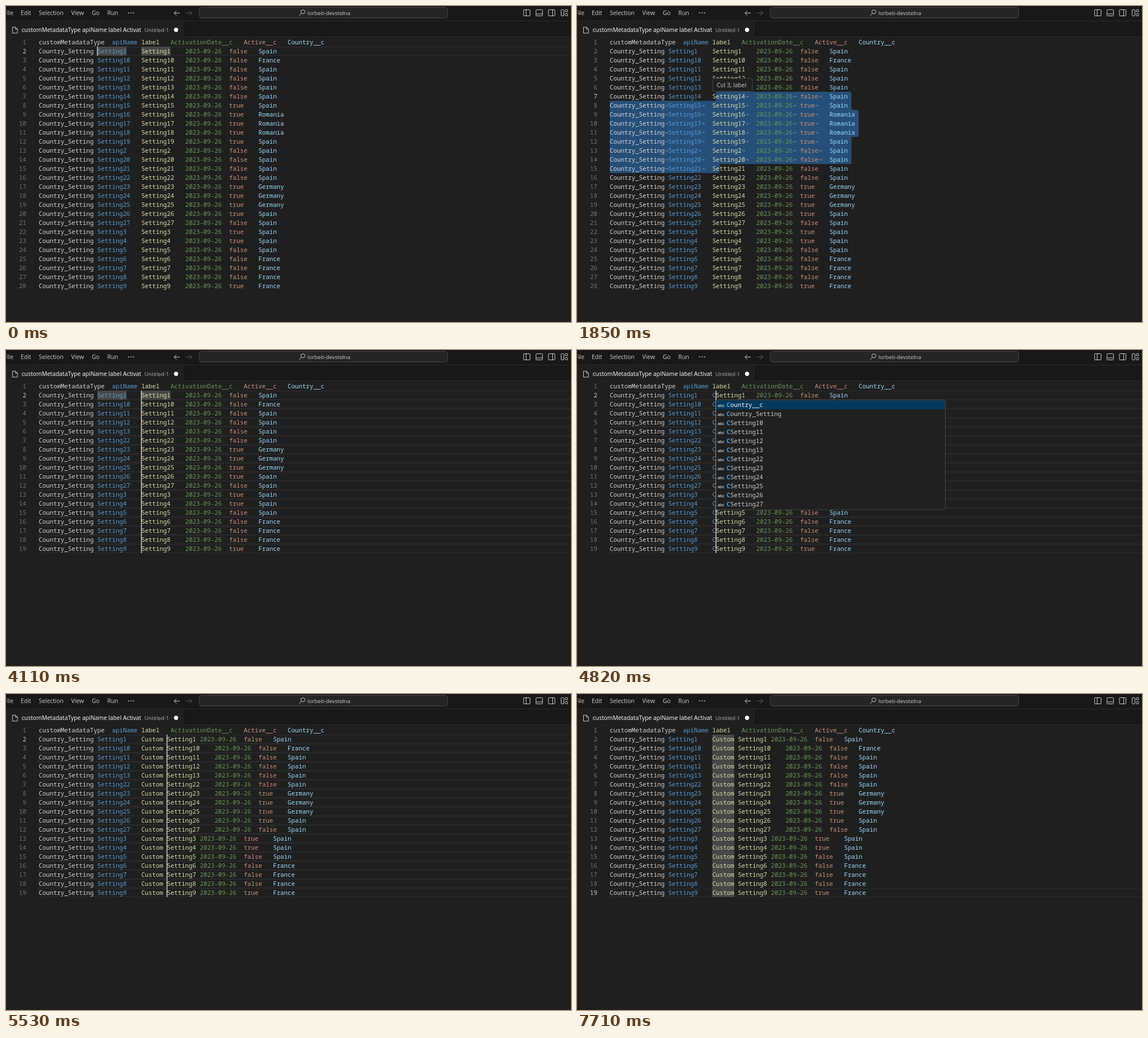
Animation of 1001x560 px, one loop 8000 ms. Source, as an HTML page:

```html
<!DOCTYPE html>
<html lang="en">
<head>
<meta charset="utf-8">
<title>Multi-cursor editing</title>
<style>
  html, body { margin: 0; width: 100%; height: 100%; overflow: hidden; background: #1f1f1f; }
  svg { display: block; width: 100%; height: 100%; }
  .code { font: 10.81px "Noto Sans Mono", "DejaVu Sans Mono", monospace; }
  .ui { font: 10.4px "Open Sans", "Noto Sans", sans-serif; fill: #ccc; }
  .icon { fill: none; stroke: #ccc; stroke-width: 1; }
</style>
</head>
<body>
<svg viewBox="0 0 1001 560" xmlns="http://www.w3.org/2000/svg">
  <rect width="1001" height="560" fill="#1f1f1f"/>
  <rect width="1001" height="55" fill="#181818"/>
  <rect y="26" width="1001" height="1" fill="#2b2b2b"/>
  <rect x="314" y="54" width="687" height="1" fill="#2b2b2b"/>
  <rect y="27" width="313" height="28" fill="#1f1f1f"/>
  <rect x="313" y="27" width="1" height="28" fill="#2b2b2b"/>
  <rect y="26" width="1" height="534" fill="#2b2b2b"/>

  <g class="ui">
    <text x="13" y="16" text-anchor="end">File</text>
    <text x="26" y="16">Edit</text>
    <text x="58" y="16">Selection</text>
    <text x="115.5" y="16">View</text>
    <text x="152" y="16">Go</text>
    <text x="179.5" y="16">Run</text>
    <circle cx="217.3" cy="12.3" r="1"/><circle cx="221.6" cy="12.3" r="1"/><circle cx="225.9" cy="12.3" r="1"/>
  </g>
  <path class="icon" d="M308 12.5H298M302 8.2L297.7 12.5L302 16.8"/>
  <path class="icon" style="stroke:#606060" d="M319 12.5H329M325 8.2L329.3 12.5L325 16.8"/>

  <rect x="342.5" y="2.5" width="440" height="19" rx="4.5" fill="#252525" stroke="#454545"/>
  <g class="icon"><circle cx="526" cy="10.3" r="3.6"/><path d="M523.4 13L519.3 17.3"/></g>
  <text class="ui" x="534" y="16" style="font-size:9.7px">lorbeti-devstelna</text>

  <g class="icon">
    <rect x="917" y="6.5" width="11.5" height="11" rx="1"/><path d="M921.5 6.5V17.5"/>
    <rect x="939" y="6.5" width="11.5" height="11" rx="1"/><path d="M939 14H950.5"/>
    <rect x="961" y="6.5" width="11.5" height="11" rx="1"/><path d="M968.5 6.5V17.5"/>
    <rect x="983.5" y="6.5" width="5" height="11" rx="1"/>
    <rect x="991" y="6.5" width="4" height="4" rx="1"/><rect x="991" y="13.5" width="4" height="4" rx="1"/>
  </g>

  <path class="icon" d="M11.5 37.5H17L20.3 40.8V48H11.5ZM16.8 37.5V41H20.3"/>
  <text class="ui" x="27.7" y="46" style="font-size:10.35px;fill:#fff">customMetadataType apiName label Activat</text>
  <text class="ui" x="245.5" y="46" style="font-size:9.3px;fill:#b4b4b4">Untitled-1</text>
  <circle cx="301.3" cy="42.3" r="3.7" fill="#fff"/>

  <g id="editor"></g>
</svg>
<script>
const LOOP = 8000, LEFT = 58, CHAR = 6.487, ROW = 16, TAB = 4;
const COLORS = ['#d4d4d4', '#569cd6', '#dcdcaa', '#6a9955', '#ce9178', '#9cdcfe'];
const HEADER = ['customMetadataType', 'apiName', 'label', 'ActivationDate__c', 'Active__c', 'Country__c'];
const ANCHOR = { line: 15, col: 30 };

const colX = col => LEFT + col * CHAR;
const lineY = line => 40 + line * ROW;
const between = (n, a, b) => n >= a && n <= b;

// Settings sorted by name, so 10 comes before 2
const ids = Array.from({ length: 27 }, (_, i) => String(i + 1)).sort();
const kept = ids.filter(id => !(between(+id, 14, 21) || id === '2'));

const isActive = n => between(n, 15, 19) || between(n, 23, 26) || [3, 4, 9].includes(n);
function country(n) {
  if (n === 10 || between(n, 6, 9)) return 'France';
  if (between(n, 16, 18)) return 'Romania';
  return between(n, 23, 25) ? 'Germany' : 'Spain';
}

const wide = ['Country__c', 'Country_Setting',
  ...kept.filter(id => id.length > 1).map(id => 'CSetting' + id)];
const narrow = ['customMetadataType', 'Country__c', 'Country_Setting'];
const single = ['customMetadataType'];

const START = { line: 2, col: 16, on: 1, mark: 'Setting1', ids, typed: '', settled: 0,
  sel: 0, multi: 0, tip: 0, tipLine: 7, list: null, listCol: 0, query: '' };
const STEPS = [
  [450, { on: 0 }],
  [920, { on: 1 }],
  [1230, { line: 12, col: 29, mark: '', sel: 1 }],
  [1300, { line: 8 }],
  [1380, { line: 7 }],
  [1770, { tip: 0.5 }],
  [1850, { tip: 1, on: 0 }],
  [2010, { ids: kept, sel: 0, tip: 0, on: 1 }],
  [2550, { on: 0 }],
  [3020, { on: 1 }],
  [3260, { line: 2, col: 28 }],
  [3480, { mark: 'Setting1' }],
  [3720, { on: 0 }],
  [4110, { multi: 1, on: 1 }],
  [4190, { tip: 0.5, tipLine: 19 }],
  [4270, { tip: 1 }],
  [4820, { typed: 'C', col: 29, mark: '', tip: 0, list: wide, listCol: 29, query: 'C' }],
  [4900, { typed: 'Cu', col: 30 }],
  [4980, { list: narrow, listCol: 30, query: 'Cu' }],
  [5140, { typed: 'Cust', col: 32, list: single, listCol: 32, query: 'Cust' }],
  [5220, { typed: 'Custo', col: 33, listCol: 33, query: 'Custo' }],
  [5370, { typed: 'Custom', col: 34, listCol: 34, query: 'Custom' }],
  [5450, { typed: 'Custom ', col: 35, list: null }],
  [5530, { settled: 1 }],
  [6000, { on: 0 }],
  [6540, { on: 1 }],
  [7010, { on: 0 }],
  [7250, { multi: 0, line: 19, col: 31, on: 1 }],
  [7480, { mark: 'Custom' }],
  [7710, { on: 0 }]
];

const rect = (x, y, w, h, fill, more = '') =>
  `<rect x="${x}" y="${y}" width="${w}" height="${h}" fill="${fill}" ${more}/>`;
const text = (x, y, str, fill, more = '') =>
  `<text x="${x}" y="${y}" fill="${fill}" ${more}>${str}</text>`;

// Places fields at tab stops
function layout(fields) {
  let col = 0;
  const cells = fields.map((str, i) => {
    const cell = { col, end: col + str.length, str, color: COLORS[i] };
    col = (Math.floor(cell.end / TAB) + 1) * TAB;
    return cell;
  });
  return { cells, end: cells[cells.length - 1].end };
}

function buildLines(s) {
  const rows = s.ids.map(id => ['Country_Setting', 'Setting' + id, s.typed + 'Setting' + id,
    '2023-09-26', String(isActive(+id)), country(+id)]);
  return [HEADER, ...rows].map(layout);
}

function drawCells(cells, y, s, line) {
  return cells.map((cell, i) => {
    const n = line > 1 && i === 2 && !s.settled ? s.typed.length : 0;
    const head = n ? text(colX(cell.col), y, cell.str.slice(0, n), COLORS[1]) : '';
    return head + text(colX(cell.col + n), y, cell.str.slice(n), cell.color);
  }).join('');
}

function drawMarks(cells, y, mark) {
  return cells.filter(c => mark && c.str.split(' ')[0] === mark)
    .map(c => rect(colX(c.col), y, mark.length * CHAR, ROW, '#474747')).join('');
}

// Rectangle with its own radius at each corner: tl, tr, br, bl
function roundBox(x1, x2, y, [a, b, c, d]) {
  const y2 = y + ROW;
  return `<path fill="#264f78" d="M${x1 + a} ${y}H${x2 - b}Q${x2} ${y} ${x2} ${y + b}V${y2 - c}` +
    `Q${x2} ${y2} ${x2 - c} ${y2}H${x1 + d}Q${x1} ${y2} ${x1} ${y2 - d}V${y + a}Q${x1} ${y} ${x1 + a} ${y}Z"/>`;
}

function tabArrow(col, y) {
  const x = colX(col) + 1, m = y + 8.5;
  return `<path d="M${x} ${m}h4.6m-1.8 -1.8l1.8 1.8l-1.8 1.8" fill="none" stroke="#fff" stroke-opacity=".3" stroke-width=".9"/>`;
}

function drawSelection(lines, s) {
  const spans = [];
  for (let n = s.line; n <= ANCHOR.line; n++) {
    spans.push({ n, from: n === s.line ? s.col : 0, to: n === ANCHOR.line ? ANCHOR.col : lines[n - 1].end + 1 });
  }
  return spans.map((p, i) => {
    const up = spans[i - 1], down = spans[i + 1];
    const r = bare => bare ? 2.5 : 0;
    const corners = [r(!up || up.from > p.from), r(!up || up.to < p.to),
      r(!down || down.to < p.to), r(!down || down.from > p.from)];
    const y = lineY(p.n);
    const arrows = lines[p.n - 1].cells.slice(0, -1)
      .filter(c => c.end >= p.from && c.end < p.to).map(c => tabArrow(c.end, y));
    return roundBox(colX(p.from), colX(p.to), y, corners) + arrows.join('');
  }).join('');
}

function drawTip(s) {
  const y = lineY(s.tipLine) - 24;
  return `<g opacity="${s.tip}">` + rect(240.5, y + 0.5, 70, 23, '#202020', 'stroke="#454545" rx="2"') +
    text(247.5, y + 16, 'Col 3, label', '#ccc', 'class="ui"') + '</g>';
}

// Colours the letters that match the query in order
function matchSpans(str, query) {
  let k = 0;
  return [...str].map(ch => {
    const hit = k < query.length && ch.toLowerCase() === query[k].toLowerCase();
    if (hit) k++;
    return hit ? `<tspan fill="#2aaaff" font-weight="600">${ch}</tspan>` : ch;
  }).join('');
}

function drawList(s) {
  const x = Math.round(colX(s.listCol)), top = 88;
  const frame = rect(x + 0.5, top + 0.5, 406, s.list.length * ROW + 2.5, '#202020', 'stroke="#454545" rx="1.5"');
  const items = s.list.map((str, i) => {
    const y = top + 13 + i * ROW;
    return text(x + 3, y - 0.5, 'abc', '#ccc', 'style="font:600 7.6px Open Sans,sans-serif;letter-spacing:-.3px"') +
      text(x + 19, y, matchSpans(str, s.query), i ? '#ccc' : '#fff');
  });
  return frame + rect(x + 1, top + 1.3, 405, ROW, '#04395e') + items.join('');
}

function draw(s) {
  const lines = buildLines(s);
  const isCursorLine = n => s.multi ? n > 1 : n === s.line;
  let back = '', front = '', cursors = '';
  lines.forEach(({ cells }, i) => {
    const n = i + 1, y = lineY(n);
    if (isCursorLine(n)) {
      if (!s.sel) back += rect(57, y, 944, 1.5, '#282828') + rect(57, y + 14.5, 944, 1.5, '#282828');
      if (s.on) cursors += rect(colX(s.col) - 0.6, y, 1.5, ROW, '#d0d0d0');
    }
    back += drawMarks(cells, y, s.mark);
    front += text(36, y + 12, n, n === s.line ? '#ccc' : '#6e7681', 'text-anchor="end"') +
      drawCells(cells, y + 12, s, n);
  });
  if (s.sel) back += drawSelection(lines, s);
  return `<g class="code">${back}${front}${cursors}${s.list ? drawList(s) : ''}</g>` + (s.tip ? drawTip(s) : '');
}

const editor = document.getElementById('editor');
let shown = -1;

function update(time) {
  const past = STEPS.filter(([at]) => at <= time % LOOP);
  if (past.length !== shown) {
    shown = past.length;
    editor.innerHTML = draw(Object.assign({}, START, ...past.map(step => step[1])));
  }
}

const begin = performance.now();
function tick() {
  update(performance.now() - begin);
  requestAnimationFrame(tick);
}
tick();
</script>
</body>
</html>
```
